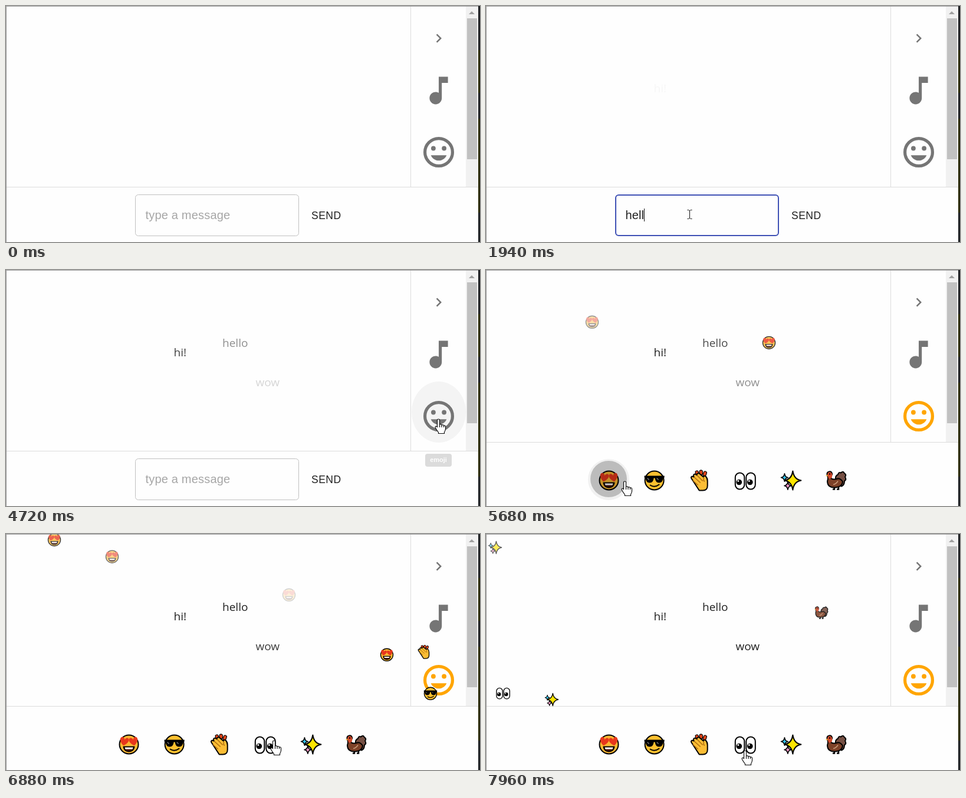
An HTML page for the animation above (8000 ms loop, 804x402 px).

```html
<!DOCTYPE html>
<html lang="en">
<head>
<meta charset="utf-8">
<title>Chat with emoji</title>
<style>
  html, body { margin: 0; width: 100%; height: 100%; overflow: hidden; background: #fefefe; }
  svg { display: block; width: 804px; height: 402px; }
  .ui { font-family: "Liberation Sans", Arial, sans-serif; }
  .field { font-size: 20px; letter-spacing: .0094em; white-space: pre; }
  .chat { font: 19px "Open Sans", "Noto Sans", sans-serif; fill: #212121; }
  .line { stroke: #dcdcdc; fill: none; }
  .ink { stroke: #000; stroke-width: 2; stroke-linejoin: round; stroke-linecap: round; }
</style>
</head>
<body>
<svg viewBox="0 0 804 402" xmlns="http://www.w3.org/2000/svg">
  <defs>
    <g id="heart"><path d="M0 6C-9 0-7-7-3-6Q-1-6 0-3Q1-6 3-6C7-7 9 0 0 6Z" fill="#e8371c"/></g>
    <g id="love">
      <circle r="16" fill="#fbb833" class="ink"/>
      <use href="#heart" transform="translate(-8 -5) rotate(12) scale(1.15)"/>
      <use href="#heart" transform="translate(8 -5) rotate(-12) scale(1.15)"/>
      <path d="M-9 4H9Q8 12 0 12T-9 4Z" fill="#4a1208" class="ink"/>
      <path d="M-7 5H7L6 8H-6Z" fill="#fff"/>
    </g>
    <g id="cool">
      <circle r="16" fill="#fdc02f" class="ink"/>
      <path d="M-17-8H17V-5L15-4Q14 4 8 4Q2 4 1-4H-1Q-2 4-8 4Q-14 4-15-4L-17-5Z"/>
      <path d="M-12-4L-9-1M4-4L7-1" stroke="#777" stroke-width="1.5"/>
      <path d="M-7 8Q0 13 8 7" fill="none" class="ink"/>
    </g>
    <g id="clap">
      <path id="ticks" d="M-5-14L-4-11M2-15V-12M9-13L8-10" fill="none" stroke="#000" stroke-width="6" stroke-linecap="round"/>
      <use href="#ticks"/>
      <path d="M-5-14L-4-11M2-15V-12M9-13L8-10" stroke="#e9481d" stroke-width="4" stroke-linecap="round"/>
      <path d="M-14-3q-2-3 1-4l3 1q-2-5 2-5l3 2q0-4 4-3l7 6q1-3 4-1q3 3 3 8v8q0 8-8 8h-6Z" fill="#fbbd35" class="ink"/>
      <path d="M-10-6L1 4M-5-9L5 1M-12 0L-3 8M7-5Q5-1 8 2" fill="none" stroke="#a9690e" stroke-width="1.4"/>
    </g>
    <g id="eyes">
      <g id="eye">
        <rect x="-17" y="-13" width="15.500" height="28" rx="7.750" fill="#fff" class="ink"/>
        <circle cx="-10.500" cy="3" r="4.800"/>
        <circle cx="-12" cy="1" r="1.400" fill="#fff"/>
      </g>
      <use href="#eye" x="18.500"/>
    </g>
    <path id="star" d="M0-16Q2-2 14 0Q2 2 0 16Q-2 2-14 0Q-2-2 0-16Z"/>
    <g id="spark" class="ink">
      <use href="#star" x="3.500" fill="#fde500"/>
      <use href="#star" transform="translate(-10.500 -5) scale(.42)" fill="#35c3ee" stroke-width="4"/>
      <use href="#star" transform="translate(-5 9) scale(.42)" fill="#f49ac8" stroke-width="4"/>
    </g>
    <g id="turkey">
      <path d="M-3 11V15H-6M4 11V15H1" fill="none" stroke="#000" stroke-width="2.500"/>
      <path d="M-1-2Q-2-8 3-10Q4-15 8-13Q12-17 14-12Q18-10 15-6Q18-2 14 1Q14 8 9 10Z" fill="#765044" class="ink"/>
      <path d="M-8-3Q-10-6-7-10Q-7-16-12-15Q-17-14-15-8Q-13-5-15 1Q-15 12-3 12Q10 12 11 2Q7-4 2-3Q-4-1-8-3Z" fill="#7d4128" class="ink"/>
      <path d="M-8-4Q-6-8-7-11Q-9-15-13-14Q-16-11-14-7L-13-3Z" fill="#d64a2c"/>
      <path d="M-15-10L-18-8L-14-7Z" fill="#f5b52e"/>
      <circle cx="-11" cy="-11" r="1.300"/>
      <path d="M-5 7Q0 6 3 1" fill="none" stroke="#c99a78" stroke-width="1.600"/>
    </g>
  </defs>

  <rect width="804" height="402" fill="#fefefe"/>
  <g class="chat">
    <text x="284.500" y="147">hi!</text>
    <text x="367" y="131">hello</text>
    <text x="423.500" y="198">wow</text>
  </g>

  <ellipse id="hover" cx="734" cy="242" rx="46" ry="52" fill="#f4f4f4"/>
  <rect id="track" x="780" width="21" height="308" fill="#f1f1f1"/>
  <rect x="782" y="21" width="17" height="240" fill="#c1c1c1"/>
  <path d="M785 14L790 9L795 14Z" fill="#a0a0a0"/>
  <path id="lines" class="line"/>
  <g fill="#757575">
    <path transform="translate(719 40) scale(1.25)" d="M10 6L8.590 7.410 13.170 12l-4.580 4.590L10 18l6-6z"/>
    <path transform="translate(702.750 112.750) scale(2.604)" d="M12 3v10.550c-.590-.340-1.270-.550-2-.550-2.210 0-4 1.790-4 4s1.790 4 4 4 4-1.790 4-4V7h4V3h-6z"/>
  </g>
  <g id="smile" transform="translate(734 249)">
    <circle r="23.400" fill="none" stroke="currentColor" stroke-width="5.200"/>
    <g fill="currentColor">
      <circle cx="-9.100" cy="-6.500" r="3.900"/>
      <circle cx="9.100" cy="-6.500" r="3.900"/>
      <path d="M-13.300 5.200H13.300C11.200 10.500 6.100 14.300 0 14.300S-11.200 10.500-13.300 5.200Z"/>
    </g>
  </g>

  <g id="form" class="ui">
    <rect id="box" fill="none"/>
    <text id="typed" class="field" x="236.500" y="363"/>
    <path id="caret" stroke="#111" d="M0 345V367"/>
    <text x="518" y="363" font-size="17.500" letter-spacing=".5" fill="#212121">SEND</text>
  </g>

  <g id="panel">
    <circle id="ring" cx="208" cy="357" r="35" fill="#f1f1f1"/>
    <g id="buttons"></g>
    <circle id="ripple" cx="208" cy="356" r="31" opacity=".22"/>
  </g>

  <g id="floats"></g>

  <g id="tip" class="ui">
    <rect x="711" y="313" width="45" height="22" rx="4" fill="#616161"/>
    <text x="733.500" y="327" text-anchor="middle" font-size="11" font-weight="bold" fill="#fff">emoji</text>
  </g>

  <path d="M0 .500H801M.500 0V402" stroke="#9c9c9c"/>
  <path d="M802.500 0V402" stroke="#1f2124" stroke-width="3"/>
  <path d="M802.500 75V148M802.500 192V352" stroke="#2a2a08" stroke-width="3"/>

  <g id="mouse">
    <path id="beam" fill="none" stroke="#111" d="M-3.500-7.500H-1.500L.500-6.500L2.500-7.500H4.500M.500-6.500V6.500M-3.500 7.500H-1.500L.500 6.500L2.500 7.500H4.500"/>
    <path id="arrow" fill="#fff" stroke="#111" d="M.500.500V16.500L4.500 13L7 19L9.500 18L7 12H12Z"/>
    <g id="hand" fill="#fff" stroke="#111" stroke-width="1.200">
      <path d="M-2.500 2Q-2.500 0-.500 0T1.500 2V9Q4 8 5 10Q7.500 9 8.500 11Q11.500 10.500 11.500 13V17Q11 20 9.500 22V24.500H-.500V22.500Q-4 18-5.500 15Q-6.500 12.500-4.500 12Q-3 12-2.500 14Z"/>
      <path d="M1.500 9V14M5 10V14M8.500 11V14"/>
    </g>
  </g>
</svg>
<script>
const LOOP = 8000, TICK = 120.3, OPEN = 4960, BLUR = 4720;
const SENT = [1460, 2550, 3520];
const KINDS = ["love", "cool", "clap", "eyes", "spark", "turkey"];

const TYPING = [
  [0, ""], [970, "h"], [1090, "hi"], [1210, "hi!"], [1460, ""],
  [1700, "h"], [1820, "he"], [1940, "hell"], [2190, "hello"], [2550, ""],
  [2800, "w"], [2920, "wo"], [3040, "wow "], [3520, ""]
];

// time, x, y
const PATH = [
  [240, 352, 396], [360, 348, 375], [480, 345, 360], [600, 345, 355],
  [3900, 345, 355], [4560, 728, 296], [4680, 734, 254], [4930, 734, 254],
  [5410, 232, 361], [5650, 235.5, 360], [6000, 235.5, 360],
  [6190, 296, 364], [6370, 300, 364], [6550, 372, 362], [6680, 372, 362],
  [6850, 455, 352], [7050, 455, 352], [7220, 520, 366], [7360, 520, 366],
  [7550, 600, 364], [7740, 600, 364], [7930, 440, 369]
];

// kind, x, start, life, time of known height, that height, px per ms
const FLOATS = [
  ["love", 480, 5450, 1450, 5650, 124, -.0167],
  ["love", 180, 5550, 1450, 5650, 89, -.0417],
  ["love", 82, 5700, 1350, 6850, 10, -.011],
  ["love", 646, 5880, 1450, 6850, 206, -.025],
  ["cool", 720, 6150, 1450, 6850, 272, -.025],
  ["clap", 709, 6540, 1300, 6850, 201, -.025],
  ["eyes", 29, 6960, 1450, 7940, 271, -.025],
  ["spark", 15, 7150, 950, 7940, 23, -.02],
  ["spark", 111, 7250, 1450, 7940, 282, -.025],
  ["turkey", 569, 7720, 1450, 7940, 134, -.025]
];

const $ = id => document.getElementById(id);
const clamp = v => Math.max(0, Math.min(1, v));
const set = (el, attrs) => { for (const k in attrs) el.setAttribute(k, attrs[k]); };
const show = (el, on) => { el.style.display = on ? "" : "none"; };

function addUse(parent, kind) {
  const el = document.createElementNS("http://www.w3.org/2000/svg", "use");
  set(el, { href: "#" + kind });
  return parent.appendChild(el);
}

KINDS.forEach((kind, i) => set(addUse($("buttons"), kind), { x: 208.5 + 77.1 * i, y: 358.5 }));
const floats = FLOATS.map(f => addUse($("floats"), f[0]));
const messages = document.querySelectorAll(".chat text");

function mouseAt(t) {
  const i = PATH.findIndex(p => p[0] > t);
  if (i < 0) return PATH[PATH.length - 1].slice(1);
  if (i === 0) return PATH[0].slice(1);
  const [t0, x0, y0] = PATH[i - 1], [t1, x1, y1] = PATH[i];
  const k = (t - t0) / (t1 - t0);
  return [x0 + (x1 - x0) * k, y0 + (y1 - y0) * k];
}

function drawForm(t) {
  const focus = t >= 480 && t < BLUR;
  const hover = t >= 360 && t < 480;
  const inset = focus ? 1 : .5;
  set($("box"), {
    x: 219 + inset, y: 321 + inset, width: 278 - 2 * inset, height: 71 - 2 * inset, rx: 5,
    stroke: focus ? "#3f51b5" : hover ? "#212121" : "#c0c0c0", "stroke-width": 2 * inset
  });
  const text = TYPING.filter(s => s[0] <= t).pop()[1];
  const typed = $("typed");
  typed.textContent = text || "type a message";
  set(typed, { fill: text ? "#212121" : "#a6a6a6" });
  const width = text ? typed.getComputedTextLength() : 0;
  set($("caret"), { transform: `translate(${Math.floor(236.5 + width) + .5} 0)` });
  show($("caret"), focus && (t < 3520 || Math.floor((t - 3520) / 530) % 2 === 0));
}

function drawMouse(t, q) {
  const [x, y] = mouseAt(q);
  const inField = t >= 360 && t < OPEN && x > 219 && x < 497 && y > 321 && y < 392;
  const onButton = t >= BLUR && (x > 687 || t >= 5320);
  set($("mouse"), { transform: `translate(${Math.round(x)} ${Math.round(y)})` });
  show($("mouse"), t >= 240);
  show($("beam"), inField);
  show($("hand"), onButton);
  show($("arrow"), !inField && !onButton);
}

function draw(t) {
  const q = Math.floor((t + 2) / TICK) * TICK;
  const open = t >= OPEN;
  const edge = open ? 293 : 308;

  messages.forEach((el, i) => {
    const k = clamp((q - SENT[i]) / 4300);
    set(el, { opacity: k * k * (3 - 2 * k) });
  });

  set($("lines"), { d: `M0 ${edge + .5}H801M686.5 0V${edge}` });
  set($("track"), { height: edge });
  set($("smile"), { color: open ? "#ffa500" : "#757575" });
  show($("hover"), t >= BLUR && t < 5080);
  set($("tip"), { opacity: t < BLUR || t >= 5080 ? 0 : t < 4840 ? .22 : .85 });

  show($("form"), !open);
  show($("panel"), open);
  show($("ring"), t >= 5440 && t < 6050);
  show($("ripple"), t >= 5560 && t < 6000);
  if (!open) drawForm(t);

  FLOATS.forEach(([, x, start, life, at, y, speed], i) => {
    const age = q - start;
    set(floats[i], {
      transform: `translate(${x} ${y + speed * (q - at)}) scale(.66)`,
      opacity: clamp(Math.min(age, life - age) / 250)
    });
  });

  drawMouse(t, q);
}

function tick(now) {
  draw(now % LOOP);
  requestAnimationFrame(tick);
}
draw(0);
requestAnimationFrame(tick);
</script>
</body>
</html>
```
